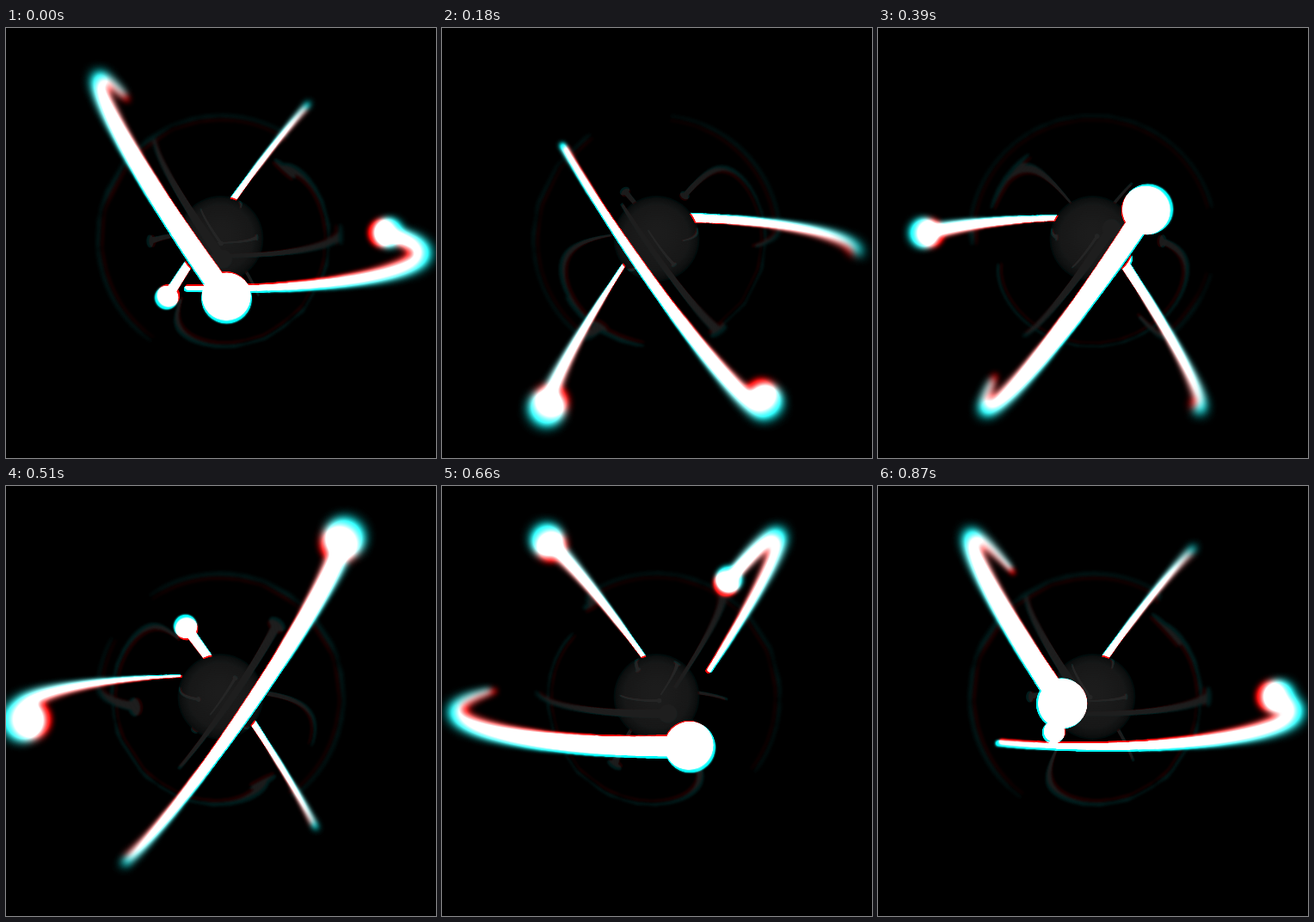
An HTML page with a canvas that plays this animation: 500x500 px, repeating every 900 ms.

```html
<!DOCTYPE html>
<html>
<head>
<meta charset="utf-8">
<style>
  html, body { margin: 0; width: 100%; height: 100%; overflow: hidden; background: #000; }
  canvas { display: block; width: 500px; height: 500px; }
</style>
</head>
<body>
<canvas id="stage" width="500" height="500"></canvas>
<script>
const { sin, cos, acos, atan2, hypot, min, PI } = Math;
const LOOP = 900, STEP = 30;
const CX = 249.5, CY = 245, FOCAL = 531;   // camera sits at z = 1
const ORBIT = 0.4, BALL = 0.0328, CORE = 0.0915, SHELL = 0.257;
const TRAIL = 108.5 * PI / 180, SEGMENTS = 56;
const PAD = 30, SIZE = 500 + 2 * PAD;
const GAIN = 1.8;                          // white is overexposed by this much

// angle of the long axis on screen, tilt towards the viewer, time at the front
const axis = 55.4 * PI / 180;
const orbits = [
  { dir: 0, tilt: 0.0655, front: 644.5 },
  { dir: axis, tilt: 0.038, front: 875.5 },
  { dir: -axis, tilt: 0.038, front: 364 }
];

function layer() {
  const c = document.createElement('canvas');
  c.width = c.height = SIZE;
  return c.getContext('2d');
}
const out = document.getElementById('stage').getContext('2d');
const mono = layer(), mix = layer(), soft = layer();

function dim(v) {
  const l = v / GAIN;
  return `rgb(${l},${l},${l})`;
}

// point on an orbit, shifted sideways out of the path by `side`
function place(o, a, side = 0) {
  const along = ORBIT * sin(a), off = o.tilt * cos(a) + side;
  const ux = cos(o.dir), uy = sin(o.dir);
  return { x: along * ux - off * uy, y: along * uy + off * ux, z: ORBIT * cos(a) };
}

const headAngle = (o, t) => (t - o.front) / LOOP * 2 * PI;
const taper = u => 1 - 0.76 * u;

function project(p) {
  const s = FOCAL / (1 - p.z);
  return { x: CX + p.x * s, y: CY + p.y * s, r: BALL * s };
}
const behind = p => p.z < 0.02 ? project(p) : null;
const ahead = p => p.z > -0.02 ? project(p) : null;

function drawDirect(c, t, map) {
  c.fillStyle = c.strokeStyle = '#fff';
  for (const o of orbits) {
    const head = headAngle(o, t);
    let prev = null;
    for (let i = 0; i <= SEGMENTS; i++) {
      const u = i / SEGMENTS, q = map(place(o, head - TRAIL * u));
      if (q && i === 0) {
        c.beginPath();
        c.arc(q.x, q.y, q.r, 0, 2 * PI);
        c.fill();
      }
      if (q && prev) {
        c.lineWidth = 0.9 * q.r * taper(u);
        c.beginPath();
        c.moveTo(prev.x, prev.y);
        c.lineTo(q.x, q.y);
        c.stroke();
      }
      prev = q;
    }
  }
}

function polar(p) {
  const flat = hypot(p.x, p.y);
  return { g: atan2(flat, p.z), d: hypot(flat, p.z), ux: p.x / (flat || 1), uy: p.y / (flat || 1) };
}

// Where a point shows up in a mirror ball of radius s.
// A negative s gives the hollow far wall, whose image is upside down.
function reflect(p, s) {
  const { g, d, ux, uy } = polar(p);
  let lo = 0, hi = min(g, acos(s));
  for (let i = 0; i < 13; i++) {
    const a = (lo + hi) / 2, b = g - a;
    const toEye = atan2(sin(a), cos(a) - s);
    const toPoint = atan2(d * sin(b), d * cos(b) - s);
    if (toEye < toPoint) lo = a; else hi = a;
  }
  const rad = FOCAL * s * sin(lo) / (1 - s * cos(lo));
  return { x: CX + ux * rad, y: CY + uy * rad };
}

function shape(c, pts) {
  c.beginPath();
  for (const q of pts) c.lineTo(q.x, q.y);
  c.closePath();
  c.fill();
  c.stroke();
}

function ballOutline(p) {
  const { g, ux, uy } = polar(p), pts = [];
  for (let i = 0; i < 20; i++) {
    const a = i / 20 * 2 * PI, m = BALL * cos(a), n = BALL * sin(a);
    pts.push({
      x: p.x - m * uy + n * cos(g) * ux,
      y: p.y + m * ux + n * cos(g) * uy,
      z: p.z - n * sin(g)
    });
  }
  return pts;
}

function drawMirror(c, t, s, light, line, limit = PI) {
  const map = p => reflect(p, s);
  c.fillStyle = c.strokeStyle = dim(light);
  c.lineWidth = line;
  for (const o of orbits) {
    const head = headAngle(o, t);
    let prev = null;
    for (let i = 0; i <= SEGMENTS; i++) {
      const u = i / SEGMENTS, a = head - TRAIL * u, w = 0.45 * BALL * taper(u);
      const p = place(o, a);
      if (polar(p).g > limit) {
        prev = null;
        continue;
      }
      if (i === 0) shape(c, ballOutline(p).map(map));
      const edge = [map(place(o, a, w)), map(place(o, a, -w))];
      if (prev) shape(c, [prev[0], edge[0], edge[1], prev[1]]);
      prev = edge;
    }
  }
}

function drawCore(c) {
  const g = c.createRadialGradient(CX, CY - 6, 5, CX, CY, 49);
  g.addColorStop(0, dim(28));
  g.addColorStop(0.75, dim(23));
  g.addColorStop(1, dim(10));
  c.fillStyle = g;
  c.beginPath();
  c.arc(CX, CY, 49, 0, 2 * PI);
  c.fill();
}

function drawChannel(t, scale, colour) {
  const c = mono;
  c.setTransform(1, 0, 0, 1, 0, 0);
  c.globalCompositeOperation = 'source-over';
  c.fillStyle = '#000';
  c.fillRect(0, 0, SIZE, SIZE);
  c.translate(PAD + CX, PAD + CY);
  c.scale(scale, scale);
  c.translate(-CX, -CY);
  c.lineCap = c.lineJoin = 'round';
  drawDirect(c, t, behind);
  c.globalCompositeOperation = 'lighten';
  drawMirror(c, t, -SHELL, 28, 1.2);
  c.globalCompositeOperation = 'source-over';
  drawCore(c);
  c.globalCompositeOperation = 'lighten';
  drawMirror(c, t, CORE, 38, 0.6, 2.5);
  drawMirror(c, t, SHELL, 30, 1.4);
  drawDirect(c, t, ahead);
  c.setTransform(1, 0, 0, 1, 0, 0);
  c.globalCompositeOperation = 'multiply';
  c.fillStyle = colour;
  c.fillRect(0, 0, SIZE, SIZE);
  mix.drawImage(c.canvas, 0, 0);
}

// lens blur that grows towards the rim: levels fade into each other
function blurOut() {
  const gap = 25;
  for (let r = 300; r >= 50; r -= gap) {
    const sigma = 6 * (r / 235) ** 2;
    soft.globalCompositeOperation = 'copy';
    soft.filter = `blur(${sigma.toFixed(2)}px) brightness(${GAIN})`;
    soft.drawImage(mix.canvas, 0, 0);
    soft.filter = 'none';
    if (r < 300) {
      const g = soft.createRadialGradient(PAD + CX, PAD + CY, r, PAD + CX, PAD + CY, r + gap);
      g.addColorStop(0, '#000');
      g.addColorStop(1, 'rgba(0,0,0,0)');
      soft.globalCompositeOperation = 'destination-in';
      soft.fillStyle = g;
      soft.fillRect(0, 0, SIZE, SIZE);
    }
    out.drawImage(soft.canvas, -PAD, -PAD);
  }
}

function render(t) {
  mix.globalCompositeOperation = 'source-over';
  mix.fillStyle = '#000';
  mix.fillRect(0, 0, SIZE, SIZE);
  mix.globalCompositeOperation = 'lighter';
  drawChannel(t, 0.982, '#f00');
  drawChannel(t, 1.018, '#0ff');
  blurOut();
}

let start = null, shown = -1;
function tick(now) {
  if (start === null) start = now;
  const t = Math.floor((now - start) % LOOP / STEP) * STEP;
  if (t !== shown) render(shown = t);
  requestAnimationFrame(tick);
}
requestAnimationFrame(tick);
</script>
</body>
</html>
```
